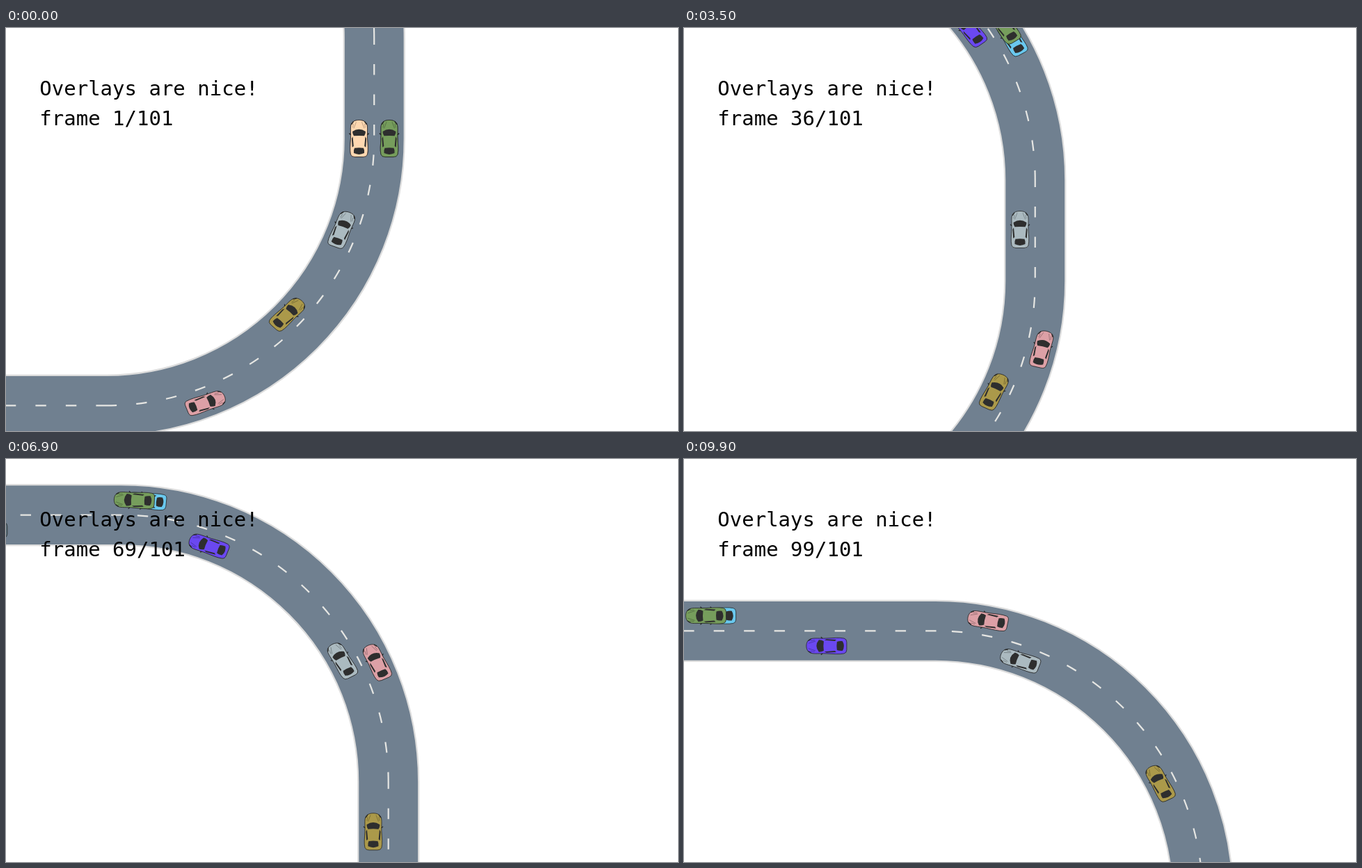
Write an HTML page with a canvas that moves like this. It is 966 px wide and 580 px high and loops after 10 s.

```html
<!DOCTYPE html>
<html lang="en">
<head>
<meta charset="utf-8">
<title>Stadium road</title>
<style>
html, body { margin: 0; width: 100%; height: 100%; overflow: hidden; background: #fff; }
canvas { display: block; }
</style>
</head>
<body>
<canvas id="stage" width="966" height="580"></canvas>
<script>
const ctx = document.getElementById('stage').getContext('2d');
const M = 14.5;                       // pixels per metre
const INNER = 25 * M, OUTER = 28 * M; // lane radii
const SIDE = 10 * M, LONG = 100 * M;  // straight lengths

// Road line at radius r; the origin is the centre of the upper bend.
// Every moveTo restarts the dashes.
function roadLine(r) {
  const p = new Path2D();
  p.moveTo(-LONG, SIDE + r);
  p.lineTo(0, SIDE + r);
  p.moveTo(0, SIDE + r);
  p.arc(0, SIDE, r, Math.PI / 2, 0, true);
  p.lineTo(r, 0);
  p.moveTo(r, 0);
  p.arc(0, 0, r, 0, -Math.PI / 2, true);
  p.moveTo(0, -r);
  p.lineTo(-LONG, -r);
  return p;
}
const middle = roadLine(26.5 * M);
const edges = [23.5, 29.5].map(r => roadLine(r * M));

// Car shapes, nose towards +x.
const body = new Path2D('M29 0C29 5 27 9.5 23 11C18 13 10 11.5 0 12C-10 12.5-18 13.5-25 12Q-29 11-29 6' +
  'L-29-6Q-29-11-25-12C-18-13.5-10-12.5 0-12C10-11.5 18-13 23-11C27-9.5 29-5 29 0Z');
const glass = new Path2D('M4-7.5Q7-9.5 11-9.5Q18 0 11 9.5Q7 9.5 4 7.5Q5 0 4-7.5Z' +
  'M-15-6.5Q-14 0-15 6.5Q-18 8-23 7.5Q-27 0-23-7.5Q-18-8-15-6.5Z' +
  'M3-9L-12-7.7L-14-9.8L0-10.6ZM3 9L-12 7.7L-14 9.8L0 10.6Z');
const lamps = new Path2D('M26.5-8L22-10.8M26.5 8L22 10.8M6-12L8-14M6 12L8 14');
const creases = new Path2D('M26-4L16-7.5M26 4L16 7.5M23-8L17-9M23 8L17 9');

// Motion laws: distance along the lane by step, zero at the end of the lower bend.
// Pull away slowly, losing `lag` pixels before reaching cruising speed.
const launch = (start, speed, lag) => t => start + speed * t - lag * (1 - Math.exp(-t / 5));
// Change smoothly from one speed to another around step `mid`.
const shift = (start, slow, fast, mid) => t =>
  start + slow * t + (fast - slow) * 5 * Math.log(1 + Math.exp((t - mid) / 5));
// Smooth curve through a few [step, distance] points.
const through = (...pts) => t => {
  const last = pts.length - 1;
  let i = 0;
  while (i < last - 1 && t > pts[i + 1][0]) i++;
  const slope = j => {
    const a = pts[Math.max(j - 1, 0)], b = pts[Math.min(j + 1, last)];
    return (b[1] - a[1]) / (b[0] - a[0]);
  };
  const [t0, u0] = pts[i], [t1, u1] = pts[i + 1];
  const h = t1 - t0, p = (t - t0) / h, q = 1 - p;
  return u0 * q * q * (1 + 2 * p) + u1 * p * p * (3 - 2 * p) +
    h * p * q * (slope(i) * q - slope(i + 1) * p);
};

const ego = {
  color: '#abbac0', r: INNER,
  at: through([0, -134], [17, -62.6], [35, 74], [54, 225], [68, 327.4], [85, 473.7], [98, 590.5])
};
const cars = [
  { color: '#5d7580', r: INNER, at: launch(227, 10, 0) },
  { color: '#6a48f0', r: INNER, at: through([0, 0], [17, 167], [35, 378], [54, 466], [98, 871]) },
  { color: '#6ac8ee', r: OUTER, at: launch(0, 11.73, 51) },
  { color: '#ffd8b1', r: INNER, at: launch(0, 14.65, 57) },
  { color: '#769d5c', r: OUTER, at: launch(0, 11.63, 27) },
  { color: '#dda0a6', r: OUTER, at: launch(-492.6, 12.8, 54.6) },
  { color: '#ab994a', r: INNER, at: shift(-279.5, 3, 8.1, 38.8) },
  ego
];

function pose({ r, at }, t) {
  const u = at(t), past = u - SIDE;
  const turn = u < 0 ? u / r : Math.min(Math.max(past / r, 0), Math.PI / 2);
  return {
    x: r * Math.cos(turn) - Math.max(0, past - r * Math.PI / 2),
    y: -r * Math.sin(turn) + SIDE - Math.min(Math.max(u, 0), SIDE),
    heading: -Math.PI / 2 - turn
  };
}

function stroke(path, color, width) {
  ctx.strokeStyle = color;
  ctx.lineWidth = width;
  ctx.stroke(path);
}

function drawRoad() {
  stroke(middle, '#708090', 6 * M);
  edges.forEach(edge => stroke(edge, '#dcdcdc', 2.2));
  ctx.save();
  ctx.lineCap = 'square';
  ctx.setLineDash([0.91 * M, 2.09 * M]);
  stroke(middle, '#e6e6e3', 2.2);
  ctx.restore();
}

function drawCar(car, t) {
  const { x, y, heading } = pose(car, t);
  ctx.save();
  ctx.translate(x, y);
  ctx.scale(1, 0.915);
  ctx.rotate(heading);
  ctx.fillStyle = car.color;
  ctx.fill(body);
  stroke(body, '#222', 0.8);
  stroke(creases, 'rgba(0,0,0,.3)', 0.9);
  stroke(lamps, '#222', 1.2);
  ctx.fillStyle = '#2e2e2e';
  ctx.fill(glass);
  ctx.restore();
}

function draw(step) {
  const t = step - 1, view = pose(ego, t);
  ctx.fillStyle = '#fff';
  ctx.fillRect(0, 0, 966, 580);
  ctx.save();
  ctx.translate(483 - view.x, 290 - view.y);
  drawRoad();
  cars.forEach(car => drawCar(car, t));
  ctx.restore();
  ctx.fillStyle = '#000';
  ctx.font = '29px "DejaVu Sans Mono", monospace';
  ctx.fillText('Overlays are nice!', 48.3, 97);
  ctx.fillText(`frame ${step}/101`, 48.3, 140);
}

function tick() {
  const n = Math.floor(performance.now() % 10000 / 100);
  // The playback holds for one beat at 0.6 s and 4.6 s.
  draw(n === 6 || n > 45 ? n : n + 1);
  requestAnimationFrame(tick);
}
tick();
</script>
</body>
</html>
```
